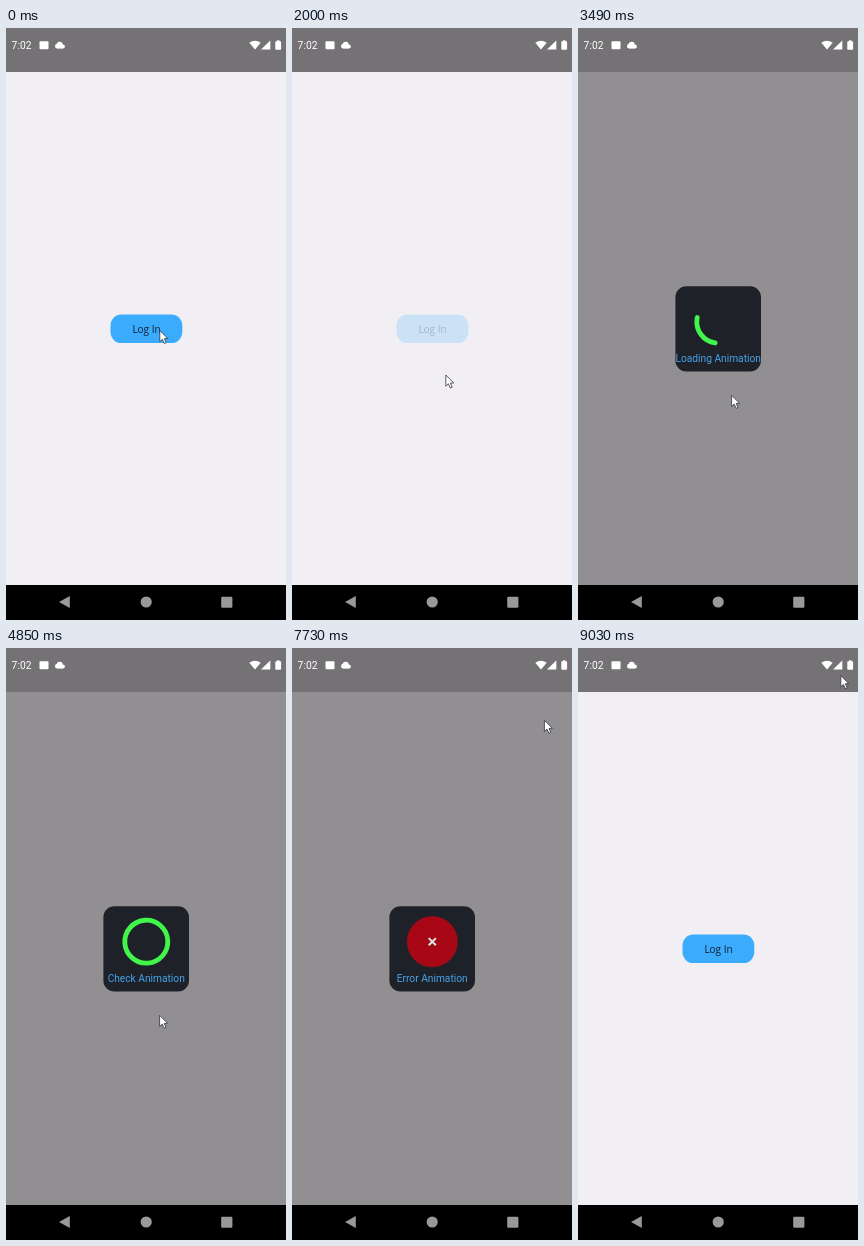
Write an HTML page with a canvas that moves like this. It is 280 px wide and 592 px high and loops after 9060 ms.

```html
<!DOCTYPE html>
<html lang="en">
<head>
<meta charset="utf-8">
<title>Log In loader</title>
<style>
html, body { margin: 0; width: 100%; height: 100%; overflow: hidden; background: #f1eff3; }
canvas { display: block; width: 280px; height: 592px; }
</style>
</head>
<body>
<canvas id="stage"></canvas>
<script>
const LOOP = 9060, W = 280, H = 592, TAU = Math.PI * 2;
const CX = 140.3, CY = 293.7, R = 21.5;
const GREEN = [66, 245, 74], RED = [168, 7, 22];

const canvas = document.getElementById('stage');
const ctx = canvas.getContext('2d');
const dpr = window.devicePixelRatio || 1;
canvas.width = W * dpr;
canvas.height = H * dpr;

const lerp = (a, b, k) => a + (b - a) * k;
const rgb = c => `rgb(${c.map(Math.round).join(',')})`;
const mix = (a, b, k) => rgb(a.map((v, i) => lerp(v, b[i], k)));

// Smooth progress from 0 to 1 between two times
function ramp(t, from, to) {
  const k = Math.min(1, Math.max(0, (t - from) / (to - from)));
  return k * k * (3 - 2 * k);
}

function box(x, y, w, h, r, fill) {
  ctx.beginPath();
  ctx.roundRect(x, y, w, h, r);
  ctx.fillStyle = fill;
  ctx.fill();
}

function disc(x, y, r, fill) {
  ctx.beginPath();
  ctx.arc(x, y, r, 0, TAU);
  ctx.fillStyle = fill;
  ctx.fill();
}

function poly(points, fill) {
  ctx.beginPath();
  points.forEach(([x, y]) => ctx.lineTo(x, y));
  ctx.closePath();
  ctx.fillStyle = fill;
  ctx.fill();
}

function label(text, x, y, font, fill, align = 'center') {
  ctx.font = font;
  ctx.textAlign = align;
  ctx.fillStyle = fill;
  ctx.fillText(text, x, y);
}

function drawStatusBar() {
  const white = '#fff';
  box(0, 0, W, 44, 0, '#757276');
  label('7:02', 5.6, 21.4, '10.3px Roboto, sans-serif', white, 'left');
  box(33.5, 13.2, 9, 8, 1, white);

  disc(51.4, 18.2, 2.4, white);
  disc(53.7, 16.7, 3, white);
  disc(56.8, 18.5, 2.1, white);
  box(51.4, 17, 5.4, 3.6, 0, white);

  ctx.beginPath();
  ctx.moveTo(249, 21.6);
  ctx.lineTo(243.3, 14.7);
  ctx.quadraticCurveTo(249, 10.9, 254.7, 14.7);
  ctx.closePath();
  ctx.fillStyle = white;
  ctx.fill();

  poly([[255, 21.6], [264.3, 21.6], [264.3, 12.4]], white);
  box(269.3, 13.3, 5.8, 8.5, 0.8, white);
  box(270.9, 12.3, 2.6, 2, 0, white);
}

function drawNavBar() {
  const gray = '#999';
  box(0, 557, W, 35, 0, '#000');
  poly([[53, 574], [63.8, 568], [63.8, 580]], gray);
  disc(140.2, 574, 5.6, gray);
  box(215.2, 568.7, 11.2, 11, 1.2, gray);
}

function drawButton(alpha) {
  ctx.globalAlpha = alpha;
  box(104.5, 286.5, 71.8, 28.6, 11, '#3aabfd');
  label('Log In', 140.5, 304.7, '10px "Open Sans", "Noto Sans", sans-serif', '#10202c');
  ctx.globalAlpha = 1;
}

function strokeLine(points, width, color) {
  ctx.beginPath();
  points.forEach(([x, y]) => ctx.lineTo(x, y));
  ctx.lineWidth = width;
  ctx.strokeStyle = color;
  ctx.stroke();
}

function drawCheck(k) {
  if (k <= 0) return;
  const a = [-10, 0.5], b = [-3, 7.5], c = [10.5, -7];
  const part = (p, q, f) => [lerp(p[0], q[0], f), lerp(p[1], q[1], f)];
  const pts = [a, part(a, b, Math.min(1, k * 3))];
  if (k > 1 / 3) pts.push(part(b, c, (k - 1 / 3) * 1.5));
  strokeLine(pts, 4, '#fff');
}

function drawCross(k) {
  if (k <= 0) return;
  const d = 7 * k;
  strokeLine([[-d, -d], [d, d]], 4 * k, '#dce6e6');
  strokeLine([[-d, d], [d, -d]], 4 * k, '#dce6e6');
}

function drawSpinner(t) {
  const leave = ramp(t, 5680, 5900);
  const success = ramp(t, 4640, 4830) * (1 - leave);
  const failure = ramp(t, 7390, 7570);
  const full = Math.max(success, failure);
  const fill = Math.max(ramp(t, 4870, 5010) * (1 - ramp(t, 5600, 5740)), ramp(t, 7560, 7690));
  const color = mix(GREEN, RED, failure);
  const mid = 2.52 + (t - 3490) / 740.6 * TAU;
  const half = lerp(0.81, Math.PI, full);

  ctx.save();
  ctx.translate(CX, CY);
  ctx.lineCap = 'round';
  ctx.lineJoin = 'round';

  // The ring thickens inward and outward until it is a disc
  const outer = lerp(R + 2.4, 25.4, fill), inner = lerp(R - 2.4, 0, fill);
  ctx.beginPath();
  ctx.arc(0, 0, (outer + inner) / 2, mid - half, mid + half);
  ctx.lineWidth = outer - inner;
  ctx.strokeStyle = color;
  if (full > 0.999) ctx.lineCap = 'butt';
  ctx.stroke();

  ctx.lineCap = 'round';
  drawCheck(ramp(t, 4970, 5200) * (1 - ramp(t, 5540, 5660)));
  ctx.lineCap = 'butt';
  drawCross(ramp(t, 7640, 7820));
  ctx.restore();
}

function drawModal(t) {
  const alpha = ramp(t, 2130, 2370) * (1 - ramp(t, 8500, 8740));
  if (alpha <= 0) return;
  const name = t < 4300 ? 'Loading' : t < 7000 ? 'Check' : 'Error';
  ctx.globalAlpha = alpha;
  box(0, 44, W, 513, 0, '#918f92');
  box(97.4, 258.3, 85.6, 85.2, 11, '#1f2129');
  drawSpinner(t);
  label(name + ' Animation', 140.2, 333.7, '10.2px Roboto, sans-serif', '#46a3e8');
  ctx.globalAlpha = 1;
}

// start, end, x and y to reach
const moves = [
  [520, 880, 153.8, 337],
  [1850, 1990, 153.8, 347],
  [2800, 3000, 153.6, 367.3],
  [5060, 5600, 252.4, 72.3],
  [8330, 8620, 262.8, 27.6]
];

function drawCursor(t) {
  let x = 153.8, y = 302.5;
  for (const [from, to, mx, my] of moves) {
    const k = ramp(t, from, to);
    x = lerp(x, mx, k);
    y = lerp(y, my, k);
  }
  ctx.save();
  ctx.translate(x, y);
  poly([[0, 0], [0, 11.2], [2.6, 8.8], [4.5, 13], [6.4, 12.2], [4.6, 8.1], [8, 8]], '#fff');
  ctx.lineWidth = 0.8;
  ctx.lineJoin = 'round';
  ctx.strokeStyle = '#303036';
  ctx.stroke();
  ctx.restore();
}

function draw(t) {
  ctx.setTransform(dpr, 0, 0, dpr, 0, 0);
  box(0, 0, W, H, 0, '#f1eff3');
  drawButton(1 - 0.79 * ramp(t, 360, 510) * (1 - ramp(t, 2080, 2330)));
  drawModal(t);
  drawStatusBar();
  drawNavBar();
  drawCursor(t);
}

const start = performance.now();
function tick() {
  draw((performance.now() - start) % LOOP);
  requestAnimationFrame(tick);
}
tick();
</script>
</body>
</html>
```
